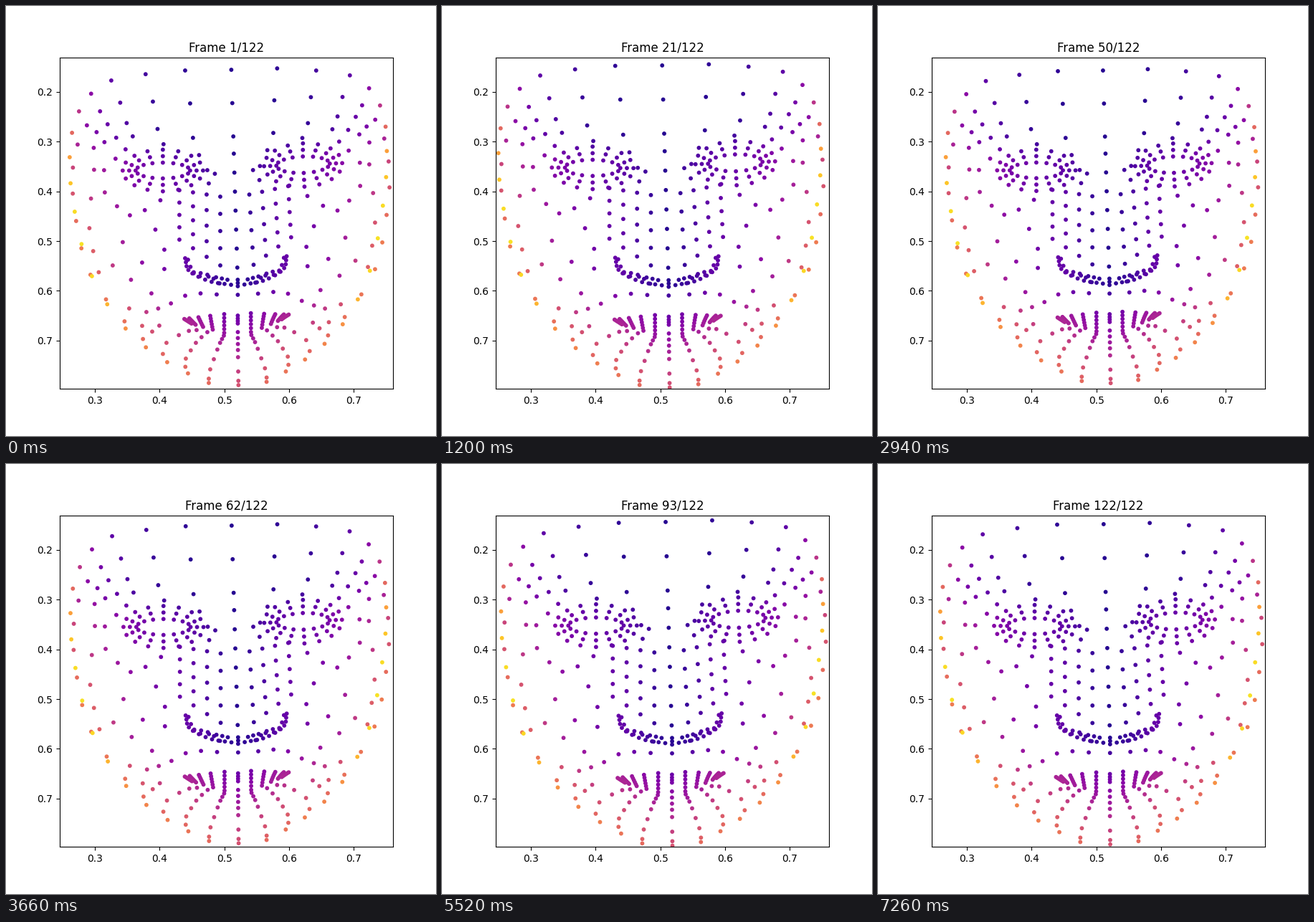
These frames come from a looping animation (600x600 px, 7.32 s). A matplotlib script:

```python
import numpy as np
import matplotlib.pyplot as plt
from matplotlib.animation import FuncAnimation

FRAMES, STEP = 122, 60
XLIM, YLIM = (0.2457, 0.7606), (0.79646, 0.13156)
BOX = (75, 72, 465, 462)          # axes rectangle in stage pixels
TOP, HEIGHT = 89, 440             # forehead to chin
LEAN = .03

# Half outline of the face: x, y, depth; the other half is its mirror image
OUTLINE = [(250, 90, .06), (147, 104, .17), (102, 147, .43), (89, 211, .78), (96, 287, .93),
           (120, 377, .92), (167, 450, .74), (225, 497, .68), (283, 526, .62)]

# Curves across forehead, brow, cheek, nostril and chin: dots, then key points
CURVES = [
    (17, (257, 136), (159.5, 135), (113, 166.5), (93.5, 225.5), (98, 300), (118, 375),
     (165.5, 440), (219, 485.5), (283, 520)),
    (11, (261, 184), (168.5, 163.5), (126.5, 176), (123, 228.5), (116.5, 310), (129.5, 371.5)),
    (5, (269.5, 208), (177, 182), (137.5, 190)),
    (3, (137, 229), (153, 213), (167, 200)),
    (3, (281, 229), (291.5, 234), (283, 247.5)),
    (5, (138, 260), (173, 292), (215.5, 271)),
    (3, (149, 362), (163, 329.5), (208.5, 312)),
    (3, (174.5, 382), (190, 358), (221, 340)),
    (2, (203, 401), (221, 367)),
    (6, (196, 427), (224, 418), (257, 402), (294, 402.5)),
    (11, (250, 352), (256, 370), (284, 384), (314, 389)),
    (8, (254, 354), (264, 375), (290, 378), (309, 382)),
    (5, (262, 371.5), (281, 375), (298, 387)),
    (6, (304, 460), (297, 474), (285, 507)),
    (5, (281, 455), (265, 470), (251, 492)),
    (4, (266, 452), (249, 455), (224, 470)),
    (4, (172, 422), (198, 454), (214, 446))]

# Head pose: frame, x, y, width, roll, yaw
POSES = np.array([
    (0, 314.8, 89, 1, -.0195, -10.5),
    (20, 307.6, 83, 1.017, -.0138, -9.5),
    (33, 318, 86, 1.013, -.0122, -14),
    (49, 314.3, 90, .977, -.0185, -9),
    (73, 316.3, 82, 1.014, -.018, -13),
    (92, 312.5, 81, 1.015, -.0235, -11.5),
    (121, 315.3, 84, 1.006, -.0147, -12)]).T


def curve(n, *pts):
    """Catmull-Rom curve through pts, sampled n times."""
    p = np.array(pts, float)
    k = len(p)
    t = np.linspace(0, k - 1, n)
    i = np.minimum(t.astype(int), k - 2)
    f = (t - i)[:, None]
    q = np.vstack([2 * p[0] - p[1], p, 2 * p[-1] - p[-2]])
    a, b, c, d = q[i], q[i + 1], q[i + 2], q[i + 3]
    return b + f / 2 * (c - a + f * (2 * a - 5 * b + 4 * c - d + f * (3 * (b - c) + d - a)))


def eye():
    """Three nested rings of 16 dots."""
    a = np.arange(16) * np.pi / 8
    return [np.column_stack([219 - (38 + 9 * k) * np.cos(a), 229.5 - (11 + 9 * k) * np.sin(a)])
            for k in range(3)]


def nose():
    """Four columns running down the side of the nose."""
    return [curve(5, (299 - 19 * k, 266 - 3 * k), (299 - 19 * k, 362 - 12 * k))
            for k in range(4)]


def lips():
    """Six rows fanning out from the corner of the mouth."""
    t = np.linspace(0, 1, 5) ** 1.5
    return [np.column_stack([(249 + 2 * k) * (1 - t) + 304.5 * t,
                             437 + 1.2 * k + (4 * k - 7) * t]) for k in range(6)]


def midline():
    spans = [(89, 182, 3), (206, 365, 7), (382, 391, 3), (403, 432, 2),
             (436, 443, 3), (455, 480, 4), (490, 510, 2), (523, 529, 2)]
    return np.concatenate([np.linspace(*s) for s in spans])


def depth(u, v):
    """Rounded towards the sides, falling back below the mouth."""
    w = (v - TOP) / HEIGHT
    side = (u / 220) ** 3 * (.3 + 1.2 * np.clip(w - .35, 0, 1))
    socket = .13 * np.clip(u / 60, 0, 1) * np.clip((v - 180) / 40, 0, 1)
    return .04 + side + socket + .5 * np.clip((v - 385) / 145, 0, 1)


def skew(u, v):
    """Half the height difference between the two brows and mouth corners."""
    brow = 2.5 * np.exp(-((v - 200) / 70) ** 2) * np.clip((190 - u) / 15, 0, 1)
    mouth = 2 * np.exp(-((v - 440) / 14) ** 2) * (u < 85) * u / 72
    return brow + mouth


def axis(v, z, x0, yaw):
    w = (v - TOP) / HEIGHT
    return x0 + LEAN * (v - TOP) + yaw * z + 2 * w ** 6


def build_face():
    """Side (-1, 0, 1), half width, height and depth of every dot."""
    inner = np.vstack([curve(*c) for c in CURVES] + eye() + nose() + lips())
    edge = curve(17, *OUTLINE)
    x, y = np.vstack([inner, edge[:, :2]]).T
    z = np.append(depth(318 - inner[:, 0], inner[:, 1]), edge[:, 2])
    _, x0, _, _, roll, yaw = POSES[:, 0]
    u = axis(y, z, x0, yaw) - x
    v = y + roll * u - skew(u, y)

    mid = midline()
    zero = 0 * mid
    side = np.repeat([-1, 1, 0], [len(u), len(u), len(mid)])
    return (side, np.concatenate([u, u, zero]), np.concatenate([v, v, mid]),
            np.concatenate([z, z, depth(zero, mid)]))


def place(side, u, v, z, pose):
    x0, y0, width, roll, yaw = pose
    height = 1 + .0031 * (TOP - y0) + .25 * (width - 1)
    x = axis(v, z, x0, yaw) + side * u * width
    y = (y0 + height * (v - TOP) + roll * side * u
         + .25 * (y0 - TOP) * z - side * skew(u, v))
    return x, y


def to_data(x, y):
    left, top, w, h = BOX
    return np.column_stack([
        XLIM[0] + (x - left) / w * (XLIM[1] - XLIM[0]),
        YLIM[1] + (y - top) / h * (YLIM[0] - YLIM[1])])


face = build_face()
fig, ax = plt.subplots(figsize=(6, 6), dpi=100)
dots = ax.scatter(*np.zeros((2, len(face[0]))), c=face[3], cmap='plasma',
                  vmin=0, vmax=1, s=10)
ax.set_xlim(XLIM)
ax.set_ylim(YLIM)
title = ax.set_title('')


def update(i):
    pose = [np.interp(i, POSES[0], p) for p in POSES[1:]]
    dots.set_offsets(to_data(*place(*face, pose)))
    title.set_text(f'Frame {i + 1}/{FRAMES}')
    return dots, title


anim = FuncAnimation(fig, update, frames=FRAMES, interval=STEP, repeat=True, repeat_delay=0)
plt.show()
```
